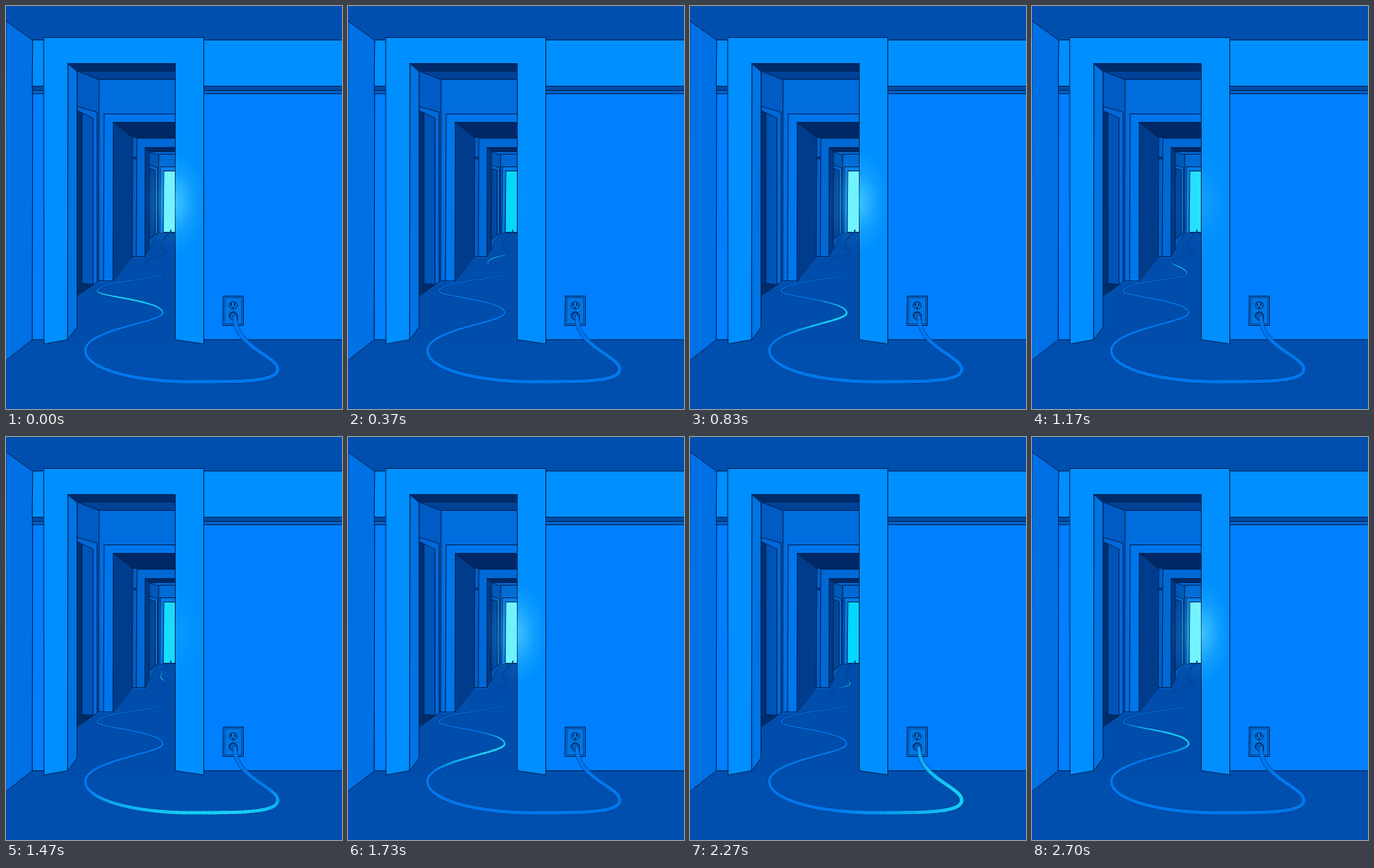
Animation, 400 px wide and 480 px high, one loop 2.73 s. Source, as an HTML page with a canvas:

```html
<!DOCTYPE html>
<html lang="en">
<head>
<meta charset="utf-8">
<title>Blue hallway</title>
<style>
html, body { margin: 0; width: 100%; height: 100%; overflow: hidden; background: #004fae; }
canvas { display: block; }
</style>
</head>
<body>
<canvas id="stage" width="400" height="480"></canvas>
<script>
const ctx = document.getElementById('stage').getContext('2d');
const PERIOD = 910;
const INK = '#00285f';
const FLOOR = '#004dab';
const SAMPLES = 24;

const clamp = (v, lo = 0, hi = 1) => Math.min(hi, Math.max(lo, v));
const mix = (a, b, t) => `rgb(${a.map((v, i) => Math.round(v + (b[i] - v) * t)).join()})`;

// A bend between two sideways extremes of the cable: vertical tangents at both ends.
function bend([x0, y0], [x1, y1]) {
  const dy = y1 - y0;
  return [[x0, y0], [x0, y0 + 0.57 * dy], [x1, y1 - 0.25 * dy], [x1, y1]];
}

function bezier(points, t) {
  const s = 1 - t, weights = [s * s * s, 3 * s * s * t, 3 * s * t * t, t * t * t];
  return [0, 1].map(axis => weights.reduce((sum, w, i) => sum + w * points[i][axis], 0));
}

function buildCable() {
  const outlet = [272, 370], right = [323, 432], bottom = [220, 447];
  const turns = [[94, 410], [186, 365], [108, 339], [184, 319], [166, 305], [190, 294], [184, 286], [196, 266]];
  const curves = [
    bend(outlet, right),
    [right, [323, 447], [280, 447], bottom],
    [bottom, [150, 447], [94, 431], turns[0]],
    ...turns.slice(1).map((turn, i) => bend(turns[i], turn))
  ];
  return Array.from({ length: curves.length * SAMPLES + 1 }, (_, i) => {
    const u = i / SAMPLES, k = Math.min(Math.floor(u), curves.length - 1);
    const [x, y] = bezier(curves[k], u - k);
    const nearness = (u < 2 ? bottom[1] : y) - 245;
    return { u, x, y, width: nearness / 45 };
  });
}
const cable = buildCable();

function poly(fill, points, outline = INK) {
  ctx.beginPath();
  for (let i = 0; i < points.length; i += 2) ctx.lineTo(points[i], points[i + 1]);
  ctx.closePath();
  ctx.fillStyle = fill;
  ctx.fill();
  if (outline) {
    ctx.strokeStyle = outline;
    ctx.lineWidth = 1;
    ctx.stroke();
  }
}

const box = (fill, l, t, r, b, outline) => poly(fill, [l, t, r, t, r, b, l, b], outline);

function drawRoom() {
  box('#004fae', -1, -1, 401, 481, null);
  poly('#0070e5', [-1, 17, 31, 40, 31, 397, -1, 422]);
  box('#007fff', 31, 40, 401, 397);
  box('#008fff', 31, 40, 401, 95);
  box('#004ca6', 31, 95, 401, 100);
  box('#0061c8', 31, 100, 401, 104);
}

function drawHall(glow) {
  // Near room
  poly('#004298', [84, 77, 201, 77, 201, 87, 110, 87]);
  poly('#005bc4', [84, 77, 110, 87, 110, 327, 84, 346]);
  poly('#0068d8', [84, 119, 108, 126, 108, 328, 84, 346]);
  poly('#0054b6', [84, 124, 103, 133, 103, 331, 84, 344]);
  poly('#002f70', [84, 124, 90, 128, 90, 330, 84, 334]);
  poly('#002c68', [84, 334, 90, 330, 103, 331, 84, 344]);
  box('#006dde', 110, 87, 201, 327);
  box('#0076eb', 116, 128, 201, 327);

  // Middle room
  poly('#003c8c', [127, 138, 150, 155, 150, 300, 127, 327]);
  poly('#002866', [127, 138, 201, 138, 201, 156, 150, 156]);
  box('#005fc6', 150, 156, 201, 298);
  box('#002d70', 150, 179, 155, 182, null);
  box('#0069d5', 155, 157, 201, 298);

  // Far room
  poly('#003a88', [165, 168, 170, 173, 170, 289, 165, 298]);
  poly('#002866', [165, 168, 201, 168, 201, 173, 170, 173]);
  poly('#0058b8', [170, 173, 181, 177, 181, 270, 170, 290]);
  poly('#0067d0', [170, 189, 180, 192, 180, 270, 170, 277]);
  poly('#00479d', [170, 193, 177, 195, 177, 272, 170, 277]);
  box('#0069d4', 181, 176, 201, 270);
  box('#007be9', 183, 191, 201, 270);
  box(mix([0, 214, 252], [120, 246, 255], glow), 187, 196, 201, 269);

  poly(FLOOR, [72, 402, 72, 382, 84, 382, 84, 347, 110, 328, 127, 328, 150, 299,
    165, 299, 181, 270, 201, 270, 201, 402], null);
}

function drawNearFrame() {
  poly('#008fff', [44, 37, 235, 37, 235, 402, 201, 397, 201, 68, 73, 68, 73, 397, 45, 402]);
  poly('#0074e2', [73, 68, 84, 77, 84, 382, 73, 397]);
  poly('#002b6b', [73, 68, 201, 68, 201, 77, 84, 77]);
}

function drawGlow(glow) {
  const halo = (left, right, strength) => {
    const g = ctx.createRadialGradient(0, 0, 1, 0, 0, 36);
    [[0, 1], [0.3, 0.65], [0.6, 0.26], [1, 0]].forEach(([at, a]) =>
      g.addColorStop(at, `rgba(95,225,255,${a * strength * glow})`));
    ctx.save();
    ctx.translate(200, 233);
    ctx.scale(1, 1.7);
    ctx.fillStyle = g;
    ctx.fillRect(left - 200, -36, right - left, 72);
    ctx.restore();
  };
  halo(160, 187, 0.5);
  halo(187, 201, 0.25);
  halo(201, 237, 0.65);
}

function drawOutlet() {
  box('#006fda', 258, 345, 282, 380);
  box('#0076e6', 260, 347, 280, 378, '#004a9c');
  ctx.strokeStyle = '#001f50';
  ctx.fillStyle = '#0080f4';
  for (const y of [356, 368]) {
    ctx.beginPath();
    ctx.ellipse(270, y, 4.8, 4.3, 0, 0, 2 * Math.PI);
    ctx.fill();
    ctx.stroke();
  }
  ctx.fillStyle = '#001f50';
  for (const x of [267, 271]) ctx.fillRect(x, 353, 1.5, 4);
  ctx.fillRect(269, 357.5, 1.6, 2);
  poly('#0060c0', [266, 366, 270, 364, 275, 367, 275, 374, 270, 374, 266, 371]);
}

// Brightness at cable position u; a pulse lives for almost two periods.
function pulseAt(u, phase) {
  const levels = [phase, phase + PERIOD].map(time => {
    const center = 0.0077 * (time - 325);
    const reach = Math.max(0.6, 1.6 - 0.28 * center);
    const offset = clamp(Math.abs(u - center) / reach);
    return clamp((time - 380) / 60) * Math.cos(offset * Math.PI / 2);
  });
  return Math.max(...levels);
}

function strokeCable(extra, color) {
  ctx.lineCap = 'round';
  for (let i = 1; i < cable.length; i++) {
    const a = cable[i - 1], b = cable[i];
    ctx.beginPath();
    ctx.moveTo(a.x, a.y);
    ctx.lineTo(b.x, b.y);
    ctx.lineWidth = Math.max(0.7, b.width + extra);
    ctx.strokeStyle = color(b);
    ctx.stroke();
  }
}

function drawCable(phase) {
  strokeCable(0.6, () => '#003d8c');
  strokeCable(-0.5, ({ u }) => {
    const depth = clamp((u - 3) / 7);
    const base = [0, 120 - 45 * depth, 238 - 70 * depth];
    return mix(base, [22, 208, 248], pulseAt(u, phase));
  });
}

const start = performance.now();

function frame() {
  const phase = (performance.now() - start) % PERIOD;
  const glow = 0.5 + 0.5 * Math.cos(2 * Math.PI * (phase + 25) / PERIOD);
  ctx.setTransform(1, 0, 0, 1, 0.5, 0.5);
  drawRoom();
  drawHall(glow);
  drawNearFrame();
  drawGlow(glow);
  drawOutlet();
  drawCable(phase);
  requestAnimationFrame(frame);
}
frame();
</script>
</body>
</html>
```
